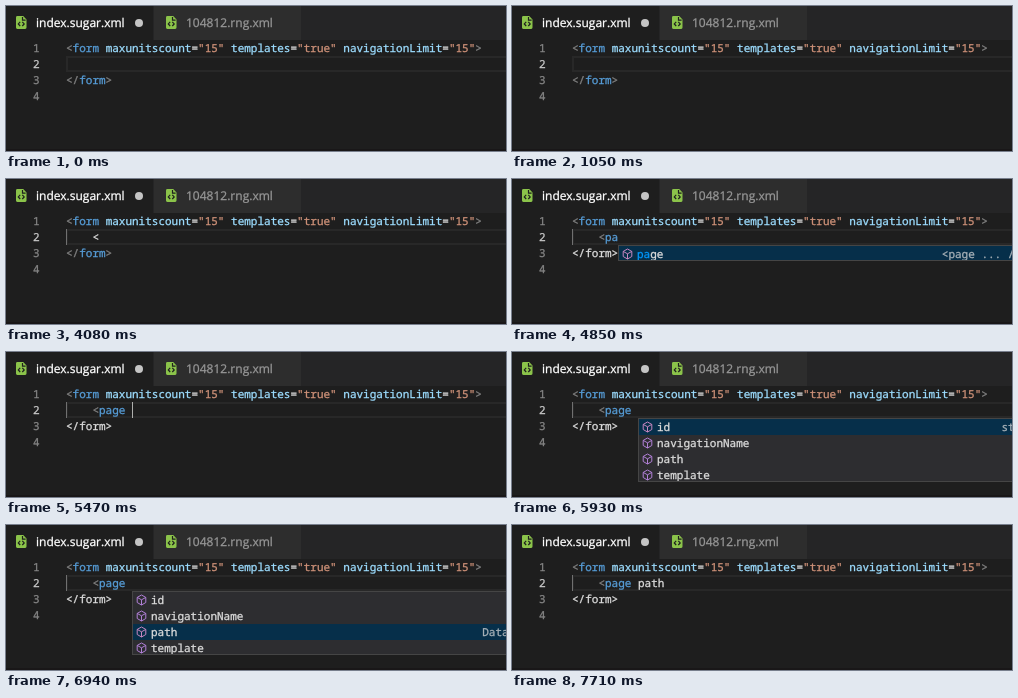
Recreate the animation shown at these times as an HTML page. Size 500x145 px, loop 8 s.

```html
<!DOCTYPE html>
<html lang="en">
<head>
<meta charset="utf-8">
<title>Editor completion</title>
<style>
  html, body { margin: 0; width: 100%; height: 100%; overflow: hidden; background: #1e1e1e; }
  svg { display: block; width: 500px; height: 145px; }
  text { white-space: pre; text-rendering: geometricPrecision; }
  text, tspan { fill: currentColor; stroke: currentColor; stroke-width: .3px; }
  .code { font: 11px "Noto Sans Mono", "DejaVu Sans Mono", monospace; color: #dcdcdc; }
  .detail { text-anchor: end; opacity: .75; }
  .tab { font: 12px "Open Sans", "Noto Sans", sans-serif; color: #969696; }
  .active { color: #fff; }
  .bracket { color: #808080; }
  .tag { color: #569cd6; }
  .attr { color: #9cdcfe; }
  .string { color: #ce9178; }
  .number { color: #858585; }
  .current { color: #c6c6c6; }
  .match { color: #0097fb; }
</style>
</head>
<body>
<svg viewBox="0 0 500 145">
  <defs>
    <g id="file">
      <path d="M1.4 0H7.2L10.5 3.4V11.6a1.3 1.3 0 0 1-1.3 1.3H1.3A1.3 1.3 0 0 1 0 11.6V1.4A1.4 1.4 0 0 1 1.4 0Z" fill="#8bc34a"/>
      <path d="M6.5 1V4.2H9.6M4.2 5.8 2.3 7.9l1.9 2.1M6.3 5.8l1.9 2.1-1.9 2.1" fill="none" stroke="#1e1e1e" stroke-width="1.2"/>
    </g>
    <path id="cube" d="M0-5 4.3-2.6V2.5L0 5-4.3 2.5V-2.6ZM-4.3-2.6 0-.2 4.3-2.6M0-.2V5" fill="none"/>
  </defs>
  <rect width="500" height="34" fill="#252526"/>
  <rect width="147" height="34" fill="#1e1e1e"/>
  <rect x="148" width="147" height="34" fill="#2d2d2d"/>
  <use href="#file" x="10" y="10"/>
  <use href="#file" x="160" y="10"/>
  <text class="tab active" x="30" y="21">index.sugar.xml</text>
  <circle cx="133" cy="17" r="4" fill="#c5c5c5"/>
  <text class="tab" x="180" y="21">104812.rng.xml</text>
  <rect y="143" width="500" height="2" fill="#191718"/>
  <rect x="61" y="51" width="460" height="14" fill="none" stroke="#282828" stroke-width="2"/>
  <g id="code" class="code"></g>
</svg>
<script>
const LOOP = 8000, LEFT = 60, CHAR = 6.6, INDENT = 4, ROW = 16;

// start time, text on line 2, caret visible, selected suggestion
const steps = [
  [0, "", false],
  [1140, "", true],
  [1600, "", false],
  [1830, "    ", true],
  [2290, "", true],
  [2690, "<", true],
  [3150, "<", false],
  [3300, "", true],
  [3530, "<", true],
  [4080, "<", false],
  [4160, "<p", true],
  [4230, "<p", true, 0],
  [4390, "<pa", true, 0],
  [4850, "<pa", false, 0],
  [5000, "<page", true],
  [5470, "<page ", true],
  [5930, "<page ", false, 0],
  [6390, "<page ", true, 0],
  [6790, "<page ", true, 1],
  [6940, "<page ", false, 2],
  [7250, "<page path", true],
  [7710, "<page path", false],
];
const elements = [["page", "<page ... />"]];
const attributes = [
  ["id", "string"], ["navigationName", "string"], ["path", "DataPath"], ["template", "string"],
];

const escapeText = s => s.replace(/</g, "&lt;").replace(/>/g, "&gt;");
const span = (kind, s) => `<tspan class="${kind}">${escapeText(s)}</tspan>`;
const text = (x, y, content, kind = "") => `<text x="${x}" y="${y}" class="${kind}">${content}</text>`;
const rect = (x, y, w, h, fill) => `<rect x="${x}" y="${y}" width="${w}" height="${h}" fill="${fill}"/>`;
const baseline = line => 30 + ROW * line;
const columnX = column => Math.round(LEFT + column * CHAR);

const attribute = (name, value) => " " + span("attr", name) + "=" + span("string", `"${value}"`);
const openingLine = span("bracket", "<") + span("tag", "form") + attribute("maxunitscount", "15") +
  attribute("templates", "true") + attribute("navigationLimit", "15") + span("bracket", ">");

function colorTag(source) {
  const [, name, rest] = source.match(/^<(\w+)(.*)$/) || [];
  return name ? span("bracket", "<") + span("tag", name) + rest : escapeText(source);
}

function popup(x, typed, selected) {
  const inTag = typed.includes(" ");
  const items = inTag ? attributes : elements;
  const matched = inTag ? 0 : typed.length - 1;
  const height = ROW * items.length;
  let out = rect(x, 66, 430, height, "#2d2d30");
  items.forEach(([label, detail], i) => {
    const top = 67 + ROW * i, y = top + 12, isSelected = i === selected;
    if (isSelected) {
      out += rect(x, top, 430, Math.min(ROW, height - 1), "#062f4a") +
        text(x + 403, y, escapeText(detail), "detail");
    }
    out += `<use href="#cube" x="${x + 9.5}" y="${top + 8}" stroke="${isSelected ? "#c586c0" : "#b180d7"}"/>` +
      text(x + 19, y, span("match", label.slice(0, matched)) + label.slice(matched));
  });
  return out + `<rect x="${x + .5}" y="66.5" width="430" height="${height - 1}" fill="none" stroke="#454545"/>`;
}

function render([, typed, caretOn, selected]) {
  const caretX = columnX(INDENT + typed.length);
  let out = [1, 2, 3, 4].map(n =>
    text(27, baseline(n), n, n === 2 ? "current" : "number")).join("");
  out += text(LEFT, baseline(1), openingLine);
  out += text(LEFT + INDENT * CHAR, baseline(2), colorTag(typed));
  // An unclosed tag swallows the closing line, which then loses its colours.
  out += text(LEFT, baseline(3), typed.trim().length > 1 ? escapeText("</form>")
    : span("bracket", "</") + span("tag", "form") + span("bracket", ">"));
  if (typed.trim()) out += rect(LEFT, 50, 1, 16, "#707070");
  if (caretOn) out += rect(caretX, 50, 1, 16, "#aeafad");
  if (selected !== undefined) out += popup(caretX, typed, selected);
  return out;
}

const code = document.getElementById("code");
const start = performance.now();
let shown;
function frame() {
  const time = (performance.now() - start) % LOOP;
  const step = steps.findLast(([from]) => from <= time);
  if (step !== shown) code.innerHTML = render(shown = step);
  requestAnimationFrame(frame);
}
frame();
</script>
</body>
</html>
```
